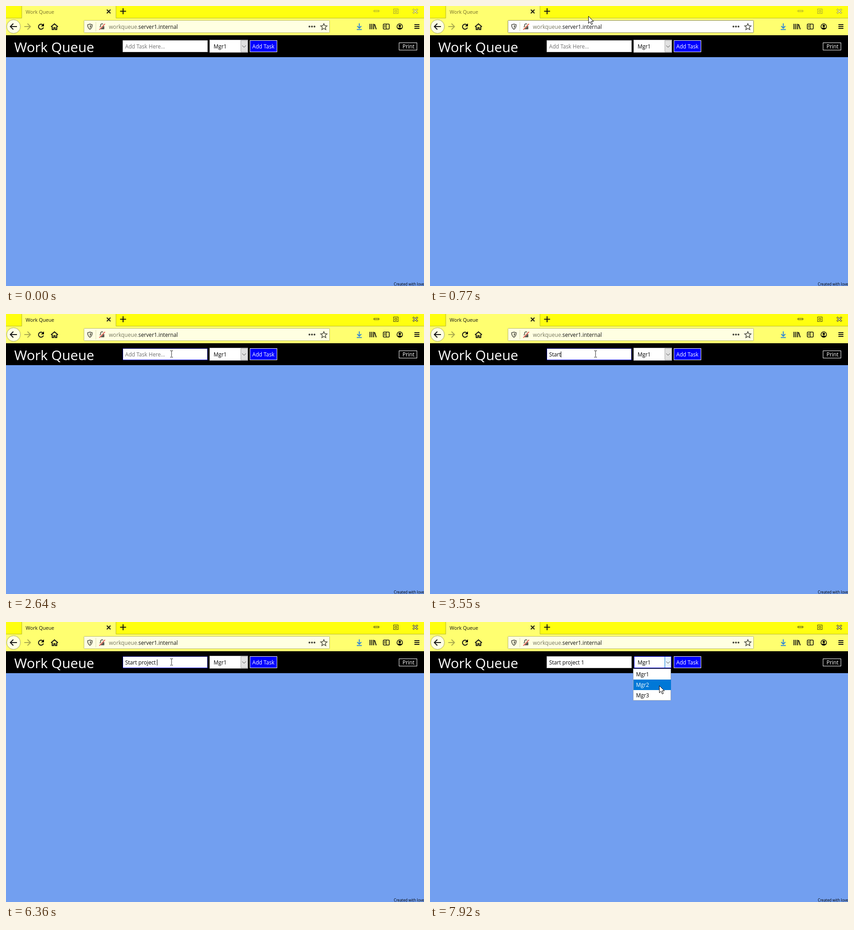
Recreate the animation shown at these times as an HTML page. Size 914 by 613 pixels, loop 7.99 s.

```html
<!DOCTYPE html>
<html lang="en">
<head>
<meta charset="utf-8">
<title>Work Queue</title>
<style>
  html, body { margin: 0; width: 100%; height: 100%; overflow: hidden; }
  svg { display: block; width: 914px; height: 613px; }
  text { font: 11.7px "Open Sans", "Noto Sans", sans-serif; }
  .line { fill: none; stroke: #111; stroke-width: 2; }
  .thin { fill: none; stroke: #4a4a40; stroke-width: 1.5; }
  .white { fill: #fff; }
</style>
</head>
<body>
<svg viewBox="0 0 914 613">
  <rect width="914" height="613" fill="#729ff0"/>

  <!-- Browser frame -->
  <rect width="914" height="27" fill="#ffff10"/>
  <rect y="26" width="914" height="38" fill="#ffff70"/>
  <path d="M0 26.5H34.5V0M240.5 0V26.5H914" fill="none" stroke="#b9b92a"/>
  <rect x="35" width="205" height="28" fill="#ffff70"/>
  <text id="tabTitle" x="43" y="17" style="font-size:10.7px">Work Queue</text>
  <path class="line" d="M220.500 8l8 8m0-8l-8 8M249.500 11.500h13M256 5v13"/>

  <g id="controls" fill="none">
    <rect x="804.500" y="9.500" width="11" height="3"/>
    <rect x="847.500" y="6.500" width="10" height="10"/>
    <rect x="850.500" y="9.500" width="4" height="4"/>
    <path d="M890 7l10 9m0-9l-10 9" stroke-width="3.600"/>
    <path d="M890.500 7.500l9 8m0-8l-9 8" style="stroke:#ffffa0" stroke-width="1.400"/>
  </g>

  <!-- Navigation -->
  <circle cx="16.500" cy="45" r="15" fill="#ffffe2" stroke="#a5a55c"/>
  <path class="line" d="M10 45h14M16 38.500l-6.500 6.500 6.500 6.500"/>
  <path class="line" d="M40 45h13M47 38.500l6.500 6.500-6.500 6.500" style="stroke:#a9a94e"/>
  <path class="line" d="M80.500 41.500a5.500 5.500 0 1 0 1.300 5.500"/>
  <path d="M83 38v6.500h-6.500z"/>
  <path class="line" d="M98.500 45.500l7.500-6.500 7.500 6.500M101 45v6.500h3.500v-4h3v4h3.500V45"/>

  <!-- Address bar -->
  <rect id="address" x="170.500" y="31.500" width="537" height="27" rx="1"/>
  <path d="M196.500 35v21" stroke="#dcdcb4"/>
  <path class="thin" d="M183.500 39.500l5 1.500c0 5-1.500 8-5 10-3.500-2-5-5-5-10z"/>
  <path d="M183.500 42l2.500.800c0 2.500-.8 4.500-2.500 5.700z" fill="#4a4a40"/>
  <rect x="205" y="44" width="10" height="7" rx="1" fill="#5a5a50"/>
  <path class="thin" d="M207 44v-2a3 3 0 0 1 6 0v2"/>
  <path d="M203.500 51.500l12.500-13" stroke="#ffffe2" stroke-width="3.500"/>
  <path d="M204 52l12.500-13" stroke="#e04a45" stroke-width="1.800"/>
  <text x="225" y="50" fill="#77775f">workqueue.<tspan fill="#111">server1.internal</tspan></text>
  <g fill="#44443a">
    <circle cx="663.500" cy="45" r="2"/><circle cx="669" cy="45" r="2"/><circle cx="674.500" cy="45" r="2"/>
  </g>
  <path class="thin" d="M695 38.500l2 4.500 5 .5-3.700 3.300 1.100 5-4.400-2.600-4.400 2.600 1.100-5-3.700-3.300 5-.5z"/>

  <!-- Toolbar icons -->
  <path class="line" d="M772.500 38v10M768 44l4.500 4.500 4.500-4.500M767 51.500h11" style="stroke:#2f86d8"/>
  <path class="line" d="M796 39v12M800 39v12M804 39v12M806 40l3.500 11"/>
  <rect class="line" x="825" y="39.500" width="13" height="11" rx="1.500" style="stroke-width:1.600"/>
  <path class="line" d="M831.500 40v10M827 43h3M827 46h3" style="stroke-width:1.300"/>
  <circle class="line" cx="861" cy="45" r="6" style="stroke-width:1.600"/>
  <circle cx="861" cy="43.500" r="2.600"/>
  <path d="M856.500 48.500q4.500-3 9 0-4.500 4.500-9 0z"/>
  <path class="line" d="M893 41h11M893 45h11M893 49h11"/>

  <!-- Page header -->
  <rect y="64" width="914" height="48"/>
  <text x="18" y="101" fill="#fff" style="font-size:30px">Work Queue</text>
  <rect id="field" x="255.500" y="75.500" width="185" height="25" fill="#fff"/>
  <path id="fieldFocus" d="M256 100.500h185" stroke="#0000e6"/>
  <text id="entry" x="260.500" y="93"></text>
  <path id="caret" d="M.5 82v13" stroke="#000"/>

  <rect x="445.500" y="74.500" width="83" height="27" fill="#fff" stroke="#c8c8c8"/>
  <rect id="selectButton" x="513.500" y="75.500" width="15" height="25"/>
  <path d="M516.500 86.500l4 4 4-4" fill="none" stroke="#444"/>
  <g id="selectFocus" fill="none">
    <rect x="445.500" y="74.500" width="83" height="27" stroke="#000"/>
    <rect x="446.500" y="75.500" width="81" height="25" stroke="#0000e6"/>
  </g>
  <text x="454" y="93">Mgr1</text>
  <rect x="533.500" y="75.500" width="59" height="25" fill="#00f" stroke="#fff"/>
  <text class="white" x="538.500" y="93">Add Task</text>
  <rect x="859.500" y="80.500" width="39" height="16" stroke="#fff"/>
  <text class="white" x="867" y="93">Print</text>
  <text x="848" y="612" style="font-size:8.200px">Created with love</text>

  <g id="menu">
    <rect x="444.500" y="102.500" width="82" height="69" fill="#fff" stroke="#a0a8b4"/>
    <rect id="highlight" x="445" width="82" height="23" fill="#0078d7"/>
    <text id="option0" x="450.500" y="118.500">Mgr1</text>
    <text id="option1" x="450.500" y="141.500">Mgr2</text>
    <text x="450.500" y="164.500">Mgr3</text>
  </g>

  <circle id="click" r="11" fill="#f7ee42" fill-opacity=".9"/>
  <path id="arrow" d="M.5.5v15.500l3.700-3.400 2.600 6 2.600-1.100-2.600-5.900h4.900z" fill="#fff" stroke="#000"/>
  <path id="beam" d="M-3-6.500h2.500l.5.500.5-.5H3M0-6V6.500M-3 7.500h2.500l.5-.5.5.5H3" fill="none" stroke="#222"/>
</svg>
<script>
const LOOP = 7990, BLINK = 530, FOCUS = 1580, OPEN = 7570;
const PHRASE = "Start project 1";
const KEY_TIMES = [2670, 3020, 3260, 3420, 3550, 3840, 4140, 4730, 4900,
                   5100, 5220, 5430, 5660, 5740, 6390];

// Pointer route: time, x, y
const ROUTE = [
  [310, 812, 606], [340, 795, 580], [370, 750, 525], [400, 675, 437],
  [460, 575, 357], [520, 485, 273], [580, 405, 190], [610, 385, 150],
  [640, 370, 100], [700, 350, 40], [740, 346, 13], [770, 346, 22],
  [900, 352, 50], [1050, 361, 87], [1110, 362, 87],
  [6790, 362, 87], [6850, 375, 102], [6950, 425, 137], [7060, 490, 125],
  [7160, 519, 93], [7260, 519, 93], [7410, 519, 83],
  [7720, 519, 83], [7920, 501, 139]
];

const $ = id => document.getElementById(id);
const set = (id, name, value) => $(id).setAttribute(name, value);
const show = (id, visible) => set(id, "visibility", visible ? "visible" : "hidden");
const inside = ([x, y], left, top, right, bottom) =>
  x >= left && x <= right && y >= top && y <= bottom;

function pointerAt(t) {
  const next = ROUTE.findIndex(point => point[0] > t);
  if (next < 0) return ROUTE.at(-1).slice(1);
  if (next === 0) return ROUTE[0].slice(1);
  const [t0, x0, y0] = ROUTE[next - 1], [t1, x1, y1] = ROUTE[next];
  const k = (t - t0) / (t1 - t0);
  return [Math.round(x0 + (x1 - x0) * k), Math.round(y0 + (y1 - y0) * k)];
}

function drawPointer(t) {
  const pointer = pointerAt(t), place = `translate(${pointer})`;
  const overText = inside(pointer, 170, 32, 708, 58) || inside(pointer, 255, 75, 441, 101);
  const present = t >= 310;
  for (const id of ["arrow", "beam", "click"]) set(id, "transform", place);
  show("arrow", present && !overText);
  show("beam", present && overText);
  show("click", (t >= 1500 && t < 1650) || (t >= OPEN && t < 7700));

  // The address bar lights up slightly beyond its edge
  const hovered = present && inside(pointer, 170, 20, 708, 60);
  set("address", "fill", hovered ? "#fff" : "#ffffe2");
  set("address", "stroke", hovered ? "#85854c" : "#b9b96a");

  const option = pointer[1] >= 126 ? 1 : 0;
  set("highlight", "y", 103 + 23 * option);
  set("option0", "fill", option === 0 ? "#fff" : "#000");
  set("option1", "fill", option === 1 ? "#fff" : "#000");
}

function drawEntry(t) {
  const typed = PHRASE.slice(0, KEY_TIMES.filter(time => time <= t).length);
  const focused = t >= FOCUS && t < OPEN;
  const blinkOn = Math.floor((t - 2110) / BLINK) % 2 === 0;
  const entry = $("entry");
  entry.textContent = typed.replaceAll(" ", "\u00a0");
  const caretX = Math.round(260.5 + (typed ? entry.getComputedTextLength() : 0));
  if (!typed) entry.textContent = "Add Task Here...";
  set("entry", "fill", typed ? "#000" : "#707070");
  set("caret", "transform", `translate(${caretX})`);
  show("caret", focused && blinkOn);
  show("fieldFocus", focused);
  set("field", "stroke", focused ? "#00007a" : "#c8c8c8");
}

function draw(t) {
  const active = t >= FOCUS, chosen = t >= OPEN;
  set("tabTitle", "fill", active ? "#111" : "#77702c");
  set("controls", "stroke", active ? "#3a3a1c" : "#a0a038");
  show("selectFocus", chosen);
  set("selectButton", "fill", chosen ? "#e5f1fb" : "#e1e1e1");
  set("selectButton", "stroke", chosen ? "#0078d7" : "#adadad");
  $("menu").style.display = t >= OPEN + 30 ? "" : "none";
  drawEntry(t);
  drawPointer(t);
}

const start = performance.now();
function tick(now) {
  draw(Math.max(0, now - start) % LOOP);
  requestAnimationFrame(tick);
}
draw(0);
requestAnimationFrame(tick);
</script>
</body>
</html>
```
